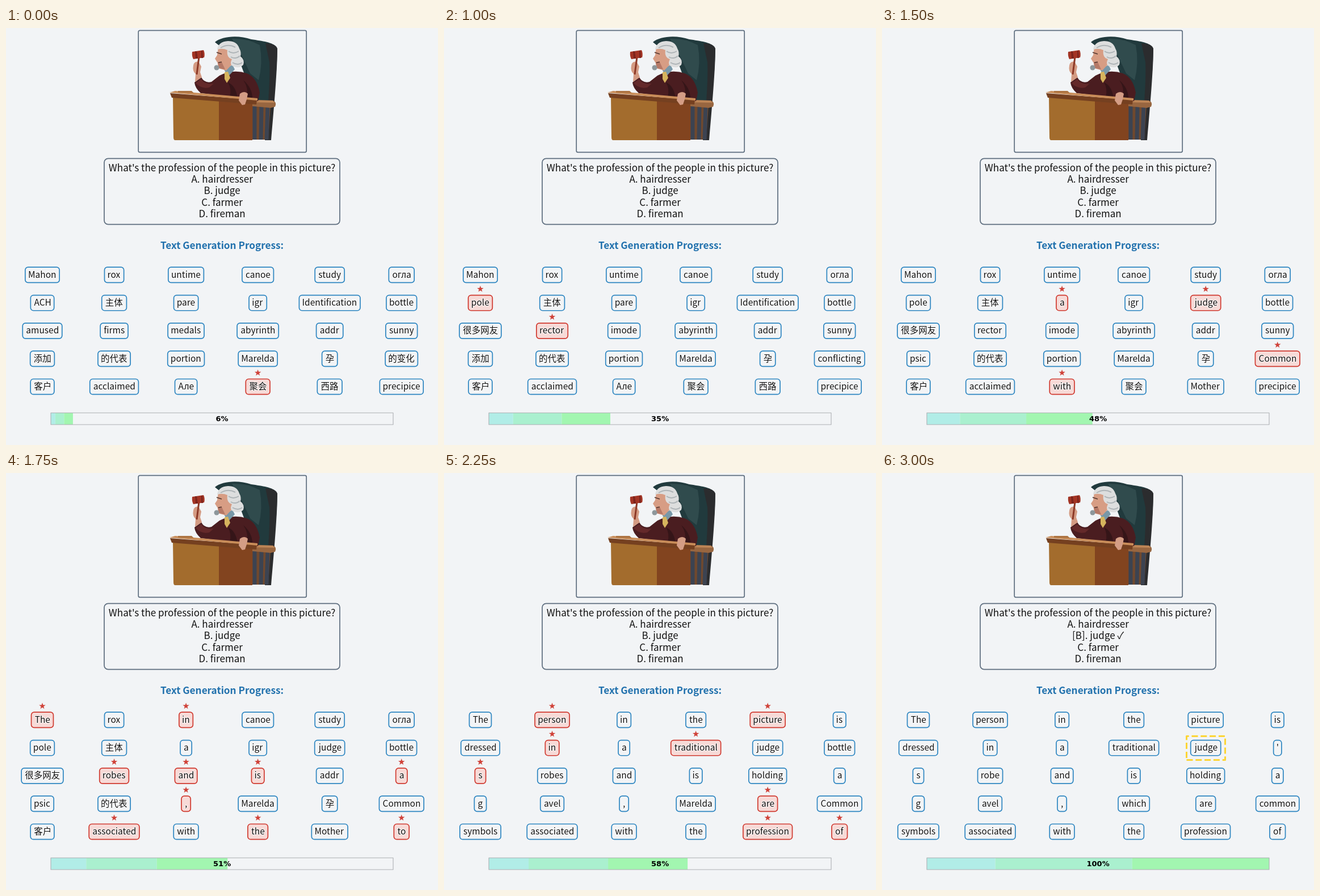
An HTML page with a canvas that plays this animation: 761 by 736 pixels, repeating every 8.25 s.

```html
<!DOCTYPE html>
<html lang="en">
<head>
<meta charset="utf-8">
<title>Text generation progress</title>
<style>
  html, body { margin: 0; width: 100%; height: 100%; overflow: hidden; background: #f2f4f6; }
  svg, canvas { position: absolute; left: 0; top: 0; }
</style>
</head>
<body>
<svg width="761" height="736" viewBox="0 0 761 736">
  <g fill="none" stroke="#5d6d7e" stroke-width="1.7">
    <rect x="233.2" y="4.3" width="296" height="215" rx="2.5"/>
    <rect x="173" y="230.3" width="415" height="116.3" rx="7"/>
  </g>
  <!-- chair -->
  <path fill="#213a3d" d="M368 25C380 14 410 12 432 20C452 23 470 25 477 34C479 60 473 110 470 135L440 135L412 60Z"/>
  <path fill="#304b4d" d="M398 19Q425 18 447 30Q453 62 445 92L430 80L416 50Z"/>
  <path fill="#2b2c2e" d="M457 27Q474 27 478 36C478 70 473 130 467 198H456Q466 100 464 60Z"/>
  <path fill="#70492e" d="M434 138H466L462 197H434Z"/>
  <path fill="none" stroke="#3c4351" stroke-width="7" d="M438 138V197M450 138L449 197M461 138L459 197"/>
  <path fill="#986640" d="M432 127L470 128Q478 131 474 139L466 141L434 138Z"/>
  <path fill="#bd8556" d="M434 127L470 128L473 132L434 131Z"/>
  <!-- robe -->
  <path fill="#4a1d20" d="M332 96L344 87Q350 98 362 95L376 84Q400 72 424 80Q442 87 447 114L444 129L410 128L392 121L343 115Q333 106 332 96Z"/>
  <path fill="#351518" d="M391 96Q398 108 394 121L408 124Q405 102 391 96ZM418 92Q428 106 424 122L434 124Q434 106 418 92Z"/>
  <path fill="#64292a" d="M334 97L344 90Q350 101 366 98L358 105Q343 108 334 97Z"/>
  <!-- raised hand and gavel -->
  <path fill="#d49b83" d="M330 66Q331 59 339 59L344 68L342 78L345 87L333 95L334 81Q328 76 330 66Z"/>
  <path stroke="#8c3927" stroke-width="3" d="M340 51L336 82"/>
  <path fill="#a33424" d="M328 42L348 39Q351 45 349 52L330 55Q327 49 328 42Z"/>
  <path fill="#7c241c" d="M333 41L336 41L338 54L334 54ZM344 40L346 40L347 53L344 53Z"/>
  <!-- head -->
  <path fill="#7898a8" d="M384 73L399 65L403 73L391 86Z"/>
  <path fill="#d6b45d" d="M385 78L391 77L395 88L389 97L385 90Z"/>
  <path fill="#d79d84" d="M374 34L394 30L400 62L388 75L374 71L373 62L368 54L372 48Z"/>
  <path fill="#b57967" d="M373 61L380 60L386 73L375 71Z"/>
  <path stroke="#55372f" stroke-width="1.6" d="M371 43L380 46M374 61L380 60"/>
  <path fill="#dddede" d="M372 38Q374 24 391 23Q407 23 411 36Q415 43 413 50Q421 56 418 65Q411 72 401 68Q393 65 398 55Q388 52 390 39Q382 35 372 38Z"/>
  <path fill="none" stroke="#aeb4b7" stroke-width="2" d="M378 35Q391 27 404 34M392 41Q400 47 410 41M396 51Q405 56 412 49M399 61Q409 67 416 61"/>
  <circle cx="371" cy="70" r="4.5" fill="#8d979b"/>
  <!-- desk -->
  <path fill="#a36c2d" d="M294 121L376 127V198H298Q295 198 295 193Z"/>
  <path fill="#82441f" d="M375 127L434 133V198H375Z"/>
  <path fill="#754020" d="M289 115L442 127L441 135L292 123Z"/>
  <path fill="#c98d59" d="M288 114L298 111L443 124L443 128Z"/>
  <path fill="#ad7442" d="M303 111H327L331 115L303 114Z"/>
  <path fill="#d49d85" d="M412 116Q420 110 426 116L424 126L421 135L416 136L410 128Z"/>
</svg>
<canvas id="stage" width="761" height="736"></canvas>
<script>
const ctx = document.getElementById('stage').getContext('2d');
const SANS = '"Noto Sans CJK SC", "Noto Sans CJK JP", "Noto Sans CJK", "Noto Sans", sans-serif';
const STEP = 250, LOOP = 8250, TOTAL = 31, COLS = 6;

const firstWords = [
  'Mahon', 'rox', 'untime', 'canoe', 'study', 'огла',
  'ACH', '主体', 'pare', 'igr', 'Identification', 'bottle',
  'amused', 'firms', 'medals', 'abyrinth', 'addr', 'sunny',
  '添加', '的代表', 'portion', 'Marelda', '孕', '的变化',
  '客户', 'acclaimed', 'Але', '聚会', '西路', 'precipice'];

// Each step: progress count and the words that change, keyed by cell.
const steps = [
  [2, {27: '聚会'}],
  [3, {23: 'conflicting'}],
  [5, {12: '很多网友'}],
  [8, {14: 'imode'}],
  [11, {6: 'pole', 13: 'rector'}],
  [13, {18: 'psic', 28: 'Mother'}],
  [15, {8: 'a', 10: 'judge', 23: 'Common', 26: 'with'}],
  [16, {0: 'The', 2: 'in', 13: 'robes', 14: 'and', 15: 'is', 17: 'a', 20: ',',
        25: 'associated', 27: 'the', 29: 'to'}],
  [17, {3: 'the', 4: 'Pictures', 5: 'is', 6: 'dressed', 16: 'holding', 18: 'g',
        19: 'avel', 24: 'symbols'}],
  [18, {1: 'person', 4: 'picture', 7: 'in', 9: 'traditional', 12: 's', 22: 'are',
        28: 'profession', 29: 'of'}],
  [19, {11: "'", 21: 'which', 23: 'common'}],
  [26, {13: 'robe'}],
  [31, {}]];

function centered(text, y, font, color = '#111') {
  ctx.font = font;
  ctx.fillStyle = color;
  ctx.textAlign = 'center';
  ctx.fillText(text, 380.6, y);
}

function star(x, y, radius) {
  ctx.beginPath();
  for (let i = 0; i < 10; i++) {
    const r = i % 2 ? radius * 0.4 : radius, a = i * Math.PI / 5;
    ctx.lineTo(x + r * Math.sin(a), y - r * Math.cos(a));
  }
  ctx.fillStyle = '#d0433a';
  ctx.fill();
}

function token(word, cell, changed) {
  const x = 64 + (cell % COLS) * 126.55;
  const y = 435.8 + Math.floor(cell / COLS) * 49.33;
  ctx.font = `15.5px ${SANS}`;
  ctx.textAlign = 'center';
  const { actualBoundingBoxLeft: left, actualBoundingBoxRight: right } = ctx.measureText(word);
  const width = left + right + 12.2;
  ctx.beginPath();
  ctx.roundRect(x - width / 2, y - 13.6, width, 27.2, 5);
  if (changed) {
    ctx.fillStyle = '#f7dad7';
    ctx.fill();
  }
  ctx.strokeStyle = changed ? '#d03a30' : '#2e86c1';
  ctx.lineWidth = 1.7;
  ctx.stroke();

  const textX = x + (left - right) / 2, textY = y + 4.9;
  ctx.strokeStyle = 'rgba(255, 255, 255, .7)';
  ctx.lineWidth = 2.5;
  ctx.lineJoin = 'round';
  ctx.strokeText(word, textX, textY);
  ctx.fillStyle = '#111';
  ctx.fillText(word, textX, textY);
  if (changed) star(x, y - 24.4, 6);
}

function progress(count) {
  const x = 79, y = 679, full = 603, width = full * count / TOTAL;
  [[0, 0.2, '#b1ede7'], [0.2, 0.6, '#aaf0cf'], [0.6, 1, '#a2f6b0']].forEach(([from, to, color]) => {
    ctx.fillStyle = color;
    ctx.fillRect(x + width * from, y, width * (to - from), 21);
  });
  ctx.strokeStyle = '#adb0b3';
  ctx.lineWidth = 1.1;
  ctx.strokeRect(x, y + 0.3, full, 20.7);
  centered(`${Math.floor(100 * count / TOTAL)}%`, 693.6, 'bold 13px "DejaVu Sans", sans-serif', '#000');
}

function answerFrame() {
  ctx.save();
  ctx.strokeStyle = '#fcd535';
  ctx.lineWidth = 3;
  ctx.setLineDash([11, 4.8]);
  ctx.beginPath();
  ctx.moveTo(536.5, 506.5);
  ctx.lineTo(604.5, 506.5);
  ctx.lineTo(604.5, 464.5);
  ctx.lineTo(536.5, 464.5);
  ctx.closePath();
  ctx.stroke();
  ctx.restore();
}

function draw(index) {
  const [count, changes] = steps[index];
  const done = index === steps.length - 1;
  const words = Object.assign([...firstWords], ...steps.slice(0, index + 1).map(step => step[1]));
  ctx.clearRect(0, 0, 761, 736);
  ["What's the profession of the people in this picture?", 'A. hairdresser',
    done ? '[B]. judge ✓' : 'B. judge', 'C. farmer', 'D. fireman'
  ].forEach((line, i) => centered(line, 252.6 + i * 20.4, `17.05px ${SANS}`));
  centered('Text Generation Progress:', 389.5, `bold 17.2px ${SANS}`, '#2171ad');
  words.forEach((word, cell) => token(word, cell, cell in changes));
  progress(count);
  if (done) answerFrame();
}

const start = performance.now();
function tick() {
  const time = (performance.now() - start) % LOOP;
  draw(Math.min(steps.length - 1, Math.floor(time / STEP)));
  requestAnimationFrame(tick);
}
tick();
</script>
</body>
</html>
```
